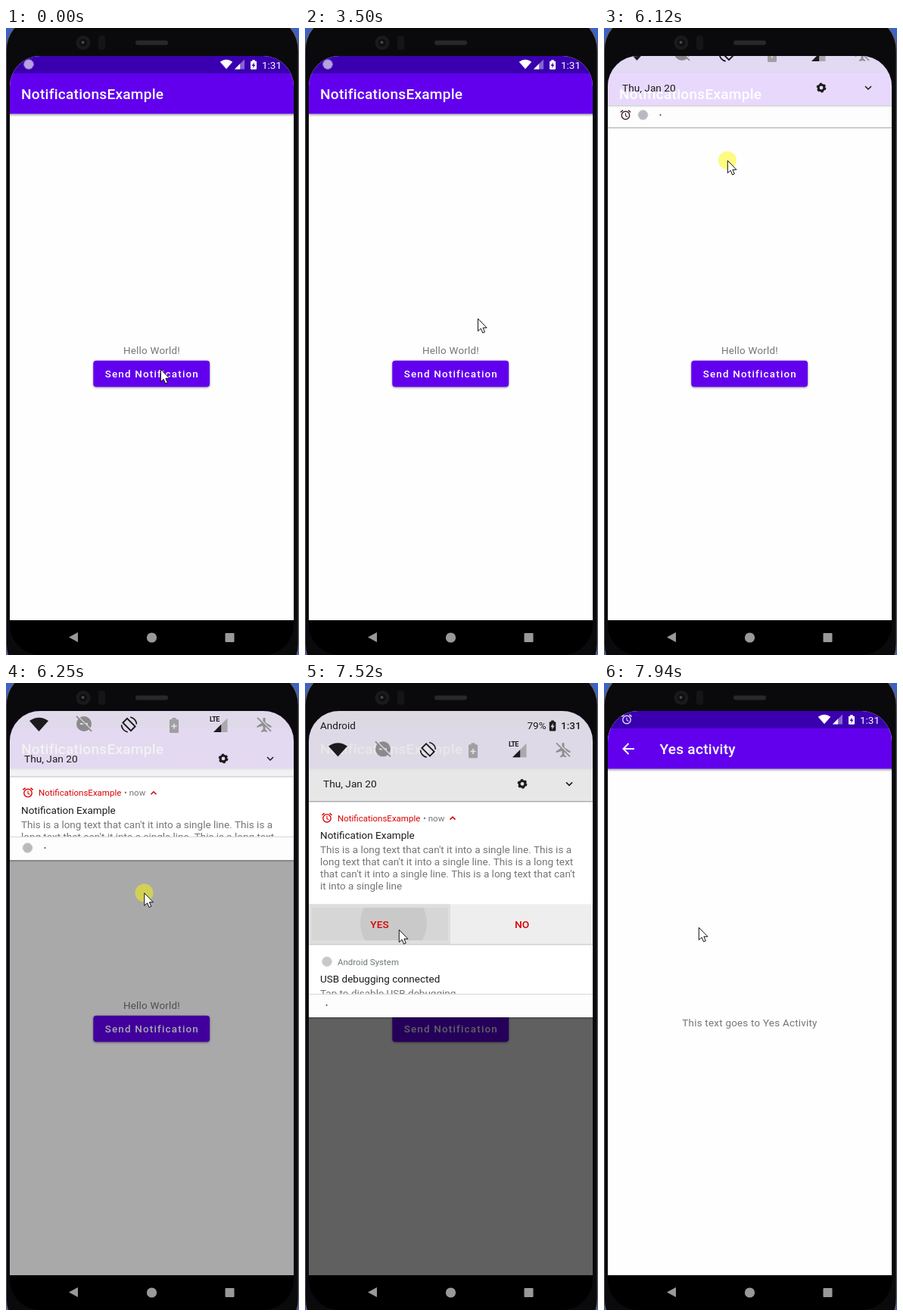
Write an HTML page with a canvas that moves like this. It is 387 px wide and 829 px high and loops after 8000 ms.

```html
<!DOCTYPE html>
<html lang="en">
<head>
<meta charset="utf-8">
<title>Notification demo</title>
<style>
html, body { margin: 0; width: 100%; height: 100%; overflow: hidden; background: #3b62c8; }
canvas { display: block; width: 387px; height: 829px; }
</style>
</head>
<body>
<canvas id="stage"></canvas>
<script>
const W = 387, H = 829, LOOP = 8000, STEP = 70;
const canvas = document.getElementById('stage');
const ctx = canvas.getContext('2d');
const dpr = window.devicePixelRatio || 1;
canvas.width = W * dpr;
canvas.height = H * dpr;

const INK = '#1b1b1d', GRAY = '#757575', RED = '#dc0000', PURPLE = '#6200ee';
const FULL = 484, PEEK = 131, SHELF = 31;

// Pointer path: time, x, y
const path = [
  [200, 204, 451], [610, 232, 425], [1220, 232, 425], [1290, 228, 426], [1700, 219, 394],
  [1895, 219, 394], [2030, 230, 394], [3435, 230, 394], [4280, 169, 57], [4370, 169, 57],
  [4440, 168.5, 53], [4680, 168, 49], [4820, 168, 49], [4880, 168, 48], [5780, 168, 48],
  [6120, 163, 175], [6400, 241, 585], [6610, 241, 585], [7160, 124, 326], [7520, 124, 326],
  [7590, 125, 323]
];

const clamp = (v, lo = 0, hi = 1) => Math.min(hi, Math.max(lo, v));
const ramp = (t, a, b) => clamp((t - a) / (b - a));
const smooth = k => k * k * (3 - 2 * k);

function pointer(t) {
  const i = path.findIndex(p => p[0] > t);
  if (i === 0) return path[0].slice(1);
  if (i < 0) return path[path.length - 1].slice(1);
  const [a, x0, y0] = path[i - 1], [b, x1, y1] = path[i];
  const k = (t - a) / (b - a);
  return [x0 + (x1 - x0) * k, y0 + (y1 - y0) * k];
}

function rect(x, y, w, h, color) {
  ctx.fillStyle = color;
  ctx.fillRect(x, y, w, h);
}
function round(x, y, w, h, r, color) {
  ctx.beginPath();
  ctx.roundRect(x, y, w, h, r);
  ctx.fillStyle = color;
  ctx.fill();
}
function disc(x, y, r, color) {
  ctx.beginPath();
  ctx.arc(x, y, r, 0, 7);
  ctx.fillStyle = color;
  ctx.fill();
}
function trace(pts) {
  ctx.beginPath();
  for (let i = 0; i < pts.length; i += 2) ctx.lineTo(pts[i], pts[i + 1]);
}
function poly(pts, color) {
  trace(pts);
  ctx.closePath();
  ctx.fillStyle = color;
  ctx.fill();
}
function line(pts, color, width) {
  trace(pts);
  ctx.strokeStyle = color;
  ctx.lineWidth = width;
  ctx.stroke();
}
function ring(x, y, r, color, width, from = 0, to = 2 * Math.PI) {
  ctx.beginPath();
  ctx.arc(x, y, r, from, to);
  ctx.strokeStyle = color;
  ctx.lineWidth = width;
  ctx.stroke();
}
function fade(y, h, alpha) {
  const g = ctx.createLinearGradient(0, y, 0, y + h);
  g.addColorStop(0, `rgba(0,0,0,${alpha})`);
  g.addColorStop(1, 'rgba(0,0,0,0)');
  rect(5, y, 375, h, g);
}
function text(str, x, y, size, color, weight = 400, spacing = 0, align = 'left') {
  ctx.font = `${weight} ${size}px Roboto, sans-serif`;
  ctx.letterSpacing = spacing + 'px';
  ctx.textAlign = align;
  ctx.fillStyle = color;
  ctx.fillText(str, x, y);
}
function layer(alpha, dy, draw) {
  if (alpha <= 0) return;
  ctx.save();
  ctx.globalAlpha *= alpha;
  ctx.translate(0, dy);
  draw();
  ctx.restore();
}
function clipped(x, y, w, h, draw) {
  if (h <= 0) return;
  ctx.save();
  ctx.beginPath();
  ctx.rect(x, y, w, h);
  ctx.clip();
  draw();
  ctx.restore();
}

// Icons
function wifi(x, y, w, h, color) {
  ctx.beginPath();
  ctx.moveTo(x, y + h / 2);
  ctx.lineTo(x - w / 2, y - h * 0.27);
  ctx.quadraticCurveTo(x, y - h * 0.74, x + w / 2, y - h * 0.27);
  ctx.fillStyle = color;
  ctx.fill();
}
function signal(x, y, s, full, pale) {
  poly([x, y, x + s, y, x + s, y - s], pale);
  poly([x, y, x + s * 0.55, y, x + s * 0.55, y - s * 0.55], full);
}
function battery(x, y, w, h, color, bolt) {
  rect(x - w * 0.22, y - h / 2, w * 0.44, h * 0.2, color);
  round(x - w / 2, y - h * 0.38, w, h * 0.88, 1, color);
  poly([x + 0.8, y - h * 0.26, x - w * 0.3, y + h * 0.12, x - 0.3, y + h * 0.12,
    x - 0.8, y + h * 0.38, x + w * 0.3, y, x + 0.3, y], bolt);
}
function alarm(x, y, color, r = 5.2) {
  ring(x, y + 0.5, r, color, 1.4);
  line([x, y - 2.5, x, y + 1, x + 2.5, y + 2.5], color, 1.1);
  line([x - 6.6, y - 3.6, x - 3.4, y - 6.3], color, 1.5);
  line([x + 6.6, y - 3.6, x + 3.4, y - 6.3], color, 1.5);
}
function badge(x, y, fill, edge) {
  disc(x, y, 6, fill);
  ctx.setLineDash([1, 1]);
  ring(x, y, 6.3, edge, 1);
  ctx.setLineDash([]);
}
function chevron(x, y, dir, color, s = 4) {
  line([x - s, y - dir * s / 2, x, y + dir * s / 2, x + s, y - dir * s / 2], color, 1.5);
}
function gear(x, y) {
  ring(x, y, 3.9, INK, 3);
  ctx.setLineDash([2.9, 2.65]);
  ring(x, y, 5.3, INK, 2.2);
  ctx.setLineDash([]);
}
function slash(x, y, r, color) {
  line([x - r + 2, y - r, x + r + 2, y + r], '#dedce3', 1.6);
  line([x - r, y - r, x + r, y + r], color, 1.7);
}
function rotation(x, y) {
  ctx.save();
  ctx.translate(x, y);
  ctx.rotate(-Math.PI / 4);
  ctx.strokeStyle = INK;
  ctx.lineWidth = 1.9;
  ctx.strokeRect(-4, -7.5, 8, 15);
  ctx.restore();
  ring(x, y, 10, INK, 1.7, 1.75, 3.1);
  ring(x, y, 10, INK, 1.7, -1.4, -0.05);
}
function plane(x, y, color) {
  poly([x - 1.4, y - 9, x + 1.4, y - 9, x + 1.6, y - 3, x + 9.5, y + 2, x + 9.5, y + 4,
    x + 1.6, y + 1.5, x + 1.4, y + 6.5, x + 4, y + 8.5, x + 4, y + 10, x, y + 9,
    x - 4, y + 10, x - 4, y + 8.5, x - 1.4, y + 6.5, x - 1.6, y + 1.5,
    x - 9.5, y + 4, x - 9.5, y + 2, x - 1.6, y - 3], color);
  slash(x, y, 9, color);
}

// Phone and app
function phone() {
  rect(0, 0, W, H, '#3b62c8');
  round(0, -18, 386.5, 880, 48, '#0a0a0c');
  ctx.strokeStyle = '#5f5f6e';
  ctx.lineWidth = 1.6;
  ctx.stroke();
  disc(102, 19.5, 9.5, '#1a1a1c');
  disc(102, 19.5, 5, '#0d0e10');
  disc(101.5, 19, 2, '#45484d');
  round(122, 10, 9, 19, 4, '#151516');
  round(171, 16.5, 43, 6, 3, '#2a2727');
}
function navBar() {
  rect(5, 783, 375, 46, '#000');
  poly([83, 805.5, 95, 799, 95, 812], '#999');
  disc(192.5, 806, 6.6, '#999');
  round(289.5, 800, 12, 12, 1, '#999');
}
function appBar(title, x) {
  rect(5, 60, 375, 53.5, PURPLE);
  fade(113.5, 4, 0.3);
  text(title, x, 94, 19.1, '#fff', 500, 0.24);
}
function mainScreen() {
  rect(5, 37, 375, 746, '#fefefe');
  appBar('NotificationsExample', 20);
  text('Hello World!', 192.5, 430.5, 13.4, GRAY, 400, 0.24, 'center');
  ctx.save();
  ctx.shadowColor = 'rgba(0,0,0,.4)';
  ctx.shadowBlur = 3 * dpr;
  ctx.shadowOffsetY = dpr;
  round(115.3, 439.7, 153.8, 34.8, 4, PURPLE);
  ctx.restore();
  text('Send Notification', 130.7, 462.3, 13.4, '#fff', 500, 1.19);
}
function yesScreen() {
  rect(5, 60, 375, 723, '#fefefe');
  appBar('Yes activity', 73.5);
  line([40, 87, 25.5, 87], '#fff', 1.9);
  line([32.5, 80, 25.5, 87, 32.5, 94], '#fff', 1.9);
  text('This text goes to Yes Activity', 192.5, 454, 13.4, GRAY, 400, 0.24, 'center');
}
function statusIcons(t) {
  const k = smooth(ramp(t, 5230, 5490));
  if (t < 7600) badge(30 + 23 * k, 48, '#b4a3e0', '#e6dff6');
  layer(k, 0, () => alarm(30, 48, '#e6def8'));
  wifi(291, 48, 16.5, 12.5, '#fff');
  signal(302, 54.5, 13, '#fff', '#8465cf');
  battery(327, 48.5, 8, 12.5, '#fff', '#3a00b0');
  text('1:31', 338, 53.6, 13.5, '#fff');
}

// Notification shade
function quickSettings() {
  wifi(43.5, 92, 25, 18, INK);
  disc(103, 91, 10, '#8b8a8d');
  rect(98, 90, 10, 2, '#dedce3');
  slash(103, 91, 10, '#8b8a8d');
  rotation(162.5, 92);
  rect(219.5, 83, 5, 3, '#a09fa2');
  round(216, 85, 12, 18, 1.5, '#a09fa2');
  rect(218.5, 93.3, 7, 1.6, '#e4e2e8');
  rect(221.2, 90.6, 1.6, 7, '#e4e2e8');
  signal(274, 102, 18.5, INK, '#aaa9ad');
  text('LTE', 269, 88, 9, INK, 700, -0.7);
  plane(341, 92, '#8f8e92');
  text('Thu, Jan 20', 24, 142, 13.7, INK);
  gear(287, 137);
  chevron(349, 137, 1, INK);
}
function yesButton(t) {
  rect(5, 296, 187, 53, '#dedede');
  const k = ramp(t, 7300, 7520);
  if (k > 0) {
    rect(9, 301, 180, 43, '#d6d6d6');
    clipped(9, 301, 180, 43, () => disc(117, 321, 8 + 36 * k, '#c9c9c9'));
  }
  text('YES', 98.5, 328, 13.7, RED, 500, 0, 'center');
}
function notifications(t) {
  rect(5, 160, 375, 325, '#fff');
  alarm(29, 182, RED);
  text('NotificationsExample', 43, 186.5, 11.5, RED);
  text('• now', 156, 186.5, 11.5, GRAY);
  chevron(195, 182.5, -1, RED, 3.5);
  text('Notification Example', 20, 210, 13.5, INK);
  ["This is a long text that can't it into a single line. This is a",
   "long text that can't it into a single line. This is a long text",
   "that can't it into a single line. This is a long text that can't",
   'it into a single line'
  ].forEach((row, i) => text(row, 20, 228.7 + 16 * i, 13.5, GRAY));
  rect(5, 296, 375, 53, '#eee');
  yesButton(t);
  text('NO', 286.5, 328, 13.7, RED, 500, 0, 'center');
  rect(5, 349, 375, 1, '#bdbdbd');
  badge(29, 372, '#c8c8c8', '#aaa');
  text('Android System', 43, 376.5, 11.5, '#70777b');
  text('USB debugging connected', 20, 400, 13.5, INK);
  text('Tap to disable USB debugging.', 20, 419, 13.5, GRAY);
  rect(5, 437, 375, 1, '#d4d4d4');
  rect(5, 438, 375, 47, '#f5f5f5');
  badge(29, 461, '#c8c8c8', '#aaa');
  text('Android System • USB charging this device', 43, 465.3, 11.5, '#70757a');
  chevron(272, 461, 1, '#666', 3.3);
}
function shelf(bottom, shift) {
  const top = bottom - SHELF;
  rect(5, top, 375, SHELF, '#fdfdfd');
  rect(5, top, 375, 1, '#d6d6d6');
  const y = bottom - 16;
  const icons = [
    [160, x => alarm(x, y, '#3d2020')],
    [350, x => badge(x, y, '#b9b9c0', '#9a9a9a')],
    [438, x => disc(x, y, 1, '#444')]
  ].filter(([from]) => from + shift >= top - 20);
  icons.forEach(([, draw], i) => draw(28.5 + 23 * i));
}
function shadeBottom(t, y) {
  if (t < 5800) return 0;
  if (t > 6610) return Math.round(FULL - (FULL - 37) * smooth(ramp(t, 7465, 7755)));
  return Math.round(clamp(Math.max(y - 44, 37 + 60 * ramp(t, 5800, 5960)), 0, FULL));
}
function shade(t, bottom) {
  rect(5, 37, 375, 746, `rgba(0,0,0,${0.62 * ramp(bottom, PEEK, 320)})`);
  const shift = bottom < PEEK
    ? bottom - PEEK - 58
    : -58 * ((FULL - bottom) / (FULL - PEEK)) ** 1.3;
  const edge = Math.round(160 + shift);
  clipped(5, 37, 375, edge - 37, () => {
    rect(5, 37, 375, edge - 37, 'rgba(255,255,255,.85)');
    layer(1, shift, quickSettings);
    layer(clamp(1.3 + shift / 25), 0, () => {
      text('Android', 20, 61.3, 13.5, INK);
      text('79%', 293.5, 61.3, 13.5, INK);
      battery(327, 56.5, 8.5, 14, INK, '#dedce3');
      text('1:31', 338, 61.3, 13.5, INK, 500);
    });
  });
  clipped(5, edge, 375, bottom - edge, () => {
    layer(1, shift, () => notifications(t));
    if (bottom < FULL) shelf(bottom, shift);
    fade(edge, 3, 0.2);
  });
  fade(bottom, 3, 0.28);
}

function cursor(x, y, pressed) {
  if (pressed) disc(x, y, 12, 'rgba(255,248,0,.49)');
  ctx.save();
  ctx.translate(x + 0.3, y + 0.3);
  poly([0, 0, 0, 16.5, 3.8, 13, 6.3, 18.8, 9, 17.6, 6.6, 12, 11.6, 12], '#fff');
  ctx.strokeStyle = '#111';
  ctx.lineWidth = 1;
  ctx.stroke();
  ctx.restore();
}

function draw(t) {
  ctx.setTransform(dpr, 0, 0, dpr, 0, 0);
  phone();
  const [x, y] = pointer(t);
  const bottom = shadeBottom(t, y);
  ctx.save();
  ctx.beginPath();
  ctx.roundRect(5, 37, 375, 792, 40);
  ctx.clip();
  mainScreen();
  const enter = smooth(ramp(t, 7630, 7900));
  clipped(5, 60, 375, 723, () => layer(enter, 50 * (1 - enter), yesScreen));
  rect(5, 37, 375, 23, '#3a00b0');
  const closed = t < 5800 ? 1 : ramp(t, 7680, 7800);
  layer(closed, 0, () => statusIcons(t));
  if (bottom > 37) shade(t, bottom);
  navBar();
  ctx.restore();
  cursor(x, y, (t >= 5840 && t < 6600) || (t >= 7310 && t < 7450));
}

const held = t => Math.floor((t - 25) / STEP) * STEP + 30;

const start = performance.now();
function tick() {
  draw(held((performance.now() - start) % LOOP));
  requestAnimationFrame(tick);
}
tick();
</script>
</body>
</html>
```
